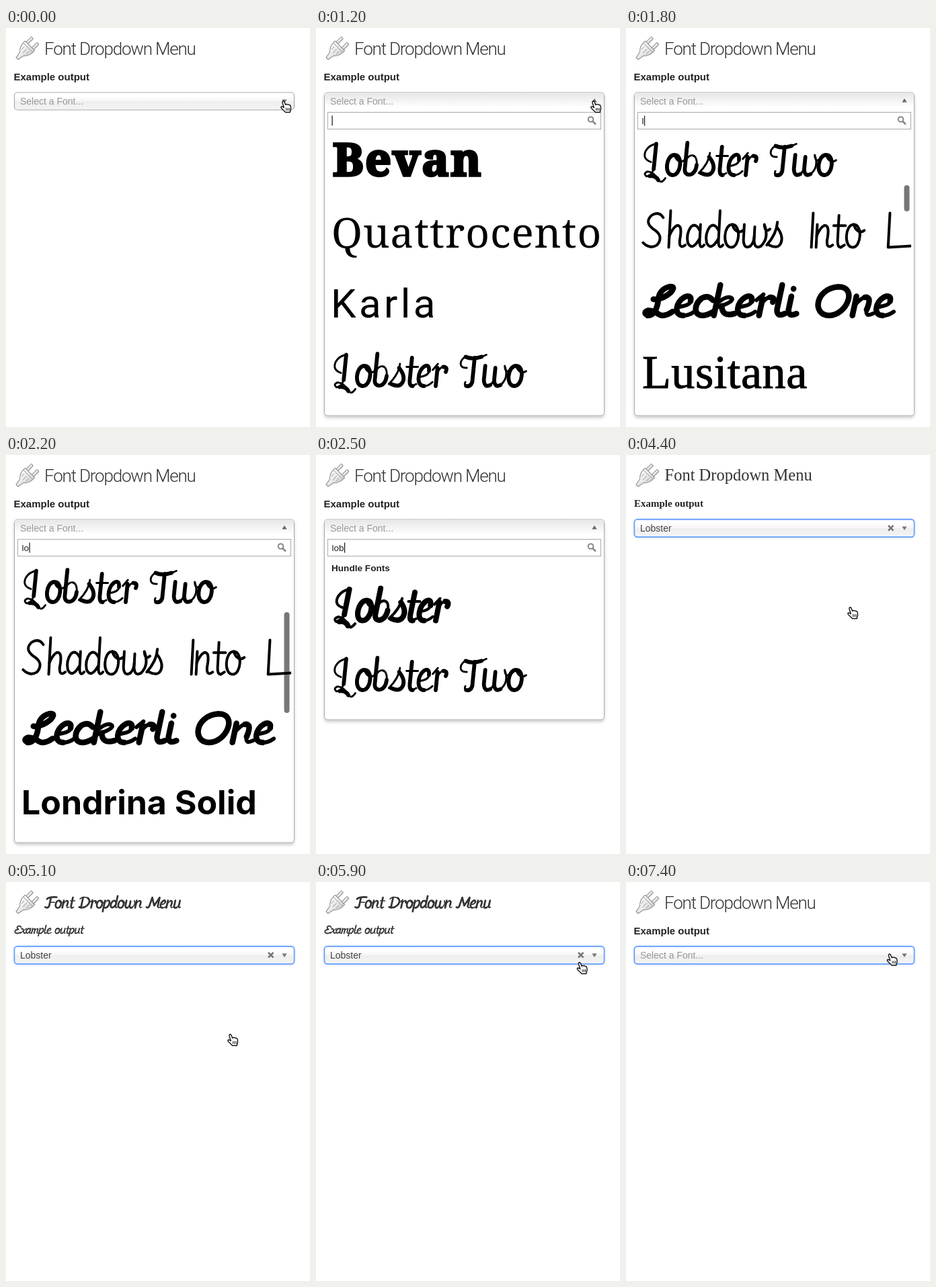
An HTML page for the animation above (8 s loop, 452 by 594 pixels).

```html
<!DOCTYPE html>
<html lang="en">
<head>
<meta charset="utf-8">
<title>Font Dropdown Menu</title>
<style>
  html, body { margin: 0; width: 100%; height: 100%; overflow: hidden; background: #fff; }
  svg { display: block; width: 100vw; height: 100vh; }
  .sans { font-family: "Liberation Sans", Arial, sans-serif; }
  .light { font-family: Roboto, sans-serif; font-weight: 300; letter-spacing: -1.2px; }
  .serif { font-family: "Liberation Serif", serif; }
  .bold { font-weight: 700; }
  .script path { fill: none; stroke: currentColor; stroke-linecap: round; stroke-linejoin: round; vector-effect: non-scaling-stroke; }
</style>
</head>
<body>
<svg id="stage" viewBox="0 0 452 594" xmlns="http://www.w3.org/2000/svg">
  <defs>
    <linearGradient id="closedFill" x2="0" y2="1">
      <stop offset=".2" stop-color="#fff"/><stop offset=".5" stop-color="#f6f6f6"/>
      <stop offset=".52" stop-color="#eee"/><stop offset="1" stop-color="#f4f4f4"/>
    </linearGradient>
    <linearGradient id="openFill" x2="0" y2="1">
      <stop offset=".1" stop-color="#e9e9e9"/><stop offset=".85" stop-color="#fff"/>
    </linearGradient>
    <linearGradient id="metal">
      <stop offset="0" stop-color="#fff"/><stop offset="1" stop-color="#d4d4d4"/>
    </linearGradient>
    <filter id="glow" x="-5%" y="-40%" width="110%" height="180%">
      <feDropShadow dx="0" dy="0" stdDeviation="1.8" flood-color="#3c7df0" flood-opacity=".55"/>
    </filter>
    <filter id="drop" x="-5%" y="-5%" width="110%" height="115%">
      <feDropShadow dx="0" dy="3" stdDeviation="2" flood-opacity=".2"/>
    </filter>
    <clipPath id="listClip"><rect x="16" y="152" width="408" height="420"/></clipPath>
  </defs>
  <rect width="452" height="594" fill="#fff"/>

  <g transform="translate(32 30) rotate(45)" fill="url(#metal)" stroke="#8a8a8a" stroke-linejoin="round">
    <rect x="-8" y="-16" width="4" height="12" rx="1"/>
    <rect x="4" y="-16" width="4" height="12" rx="1"/>
    <path d="M-10-5H10V0Q9 8 4 12L2 22H-2L-4 12Q-9 8-10 0z"/>
    <path d="M-10-1H10M-5 2v6M0 2v8M5 2v6" fill="none" stroke="#aaa"/>
  </g>

  <g id="headSans" fill="#333">
    <text class="light" x="57" y="39.5" font-size="26">Font Dropdown Menu</text>
    <text class="sans bold" x="11.5" y="78" font-size="15" fill="#222">Example output</text>
  </g>
  <g id="headSerif" class="serif" fill="#333">
    <text x="57.5" y="38" font-size="24.5">Font Dropdown Menu</text>
    <text class="bold" x="12" y="77" font-size="15" fill="#222">Example output</text>
  </g>
  <g id="headScript" color="#333"></g>

  <g id="closed">
    <rect id="field" x="12.5" y="96" width="416" height="26" rx="4.5" fill="url(#closedFill)"/>
    <path d="M410.3 106.5h7.4l-3.7 5.5z" fill="#777"/>
    <path id="clear" d="M390 105l7.5 7.5m0-7.5l-7.5 7.5" stroke="#777" stroke-width="2.5"/>
  </g>

  <g id="open">
    <rect id="panel" x="12.5" y="96" width="416" rx="4.5" fill="#fff" stroke="#aaa" filter="url(#drop)"/>
    <path d="M13 122v-21.5q0-4 4-4H424q4 0 4 4V122z" fill="url(#openFill)"/>
    <path d="M410.3 110.5h7.4l-3.7-5.5z" fill="#666"/>
    <rect x="17.5" y="125.5" width="406" height="25" fill="#fff" stroke="#aaa"/>
    <g fill="none" stroke="#888" stroke-width="2">
      <circle cx="408.5" cy="136" r="3.8"/><path d="M411.5 139l4.5 4.5" stroke-width="2.5"/>
    </g>
    <text id="query" class="sans" x="23.5" y="142.5" font-size="13.5" fill="#222"></text>
    <rect id="caret" y="130.5" width="1.2" height="15" fill="#111"/>
    <g clip-path="url(#listClip)">
      <g id="listAll">
        <text x="25" y="220" font-size="68" font-weight="700" font-family="'Noto Serif', serif" stroke="#000" stroke-width="3.5" letter-spacing="2.2">Bevan</text>
        <text x="23" y="327" font-size="62" font-weight="300" font-family="'Noto Serif', serif" letter-spacing="1">Quattrocento</text>
        <text x="22" y="431" font-size="60" font-family="Roboto, sans-serif" letter-spacing="4.4">Karla</text>
      </g>
      <g id="listL">
        <text id="lusitana" class="serif" x="24" y="536" font-size="70" stroke="#000" letter-spacing=".6">Lusitana</text>
        <text id="solid" x="23" y="535" font-size="50" font-weight="700" font-family="Inter, sans-serif">Londrina Solid</text>
        <rect id="thumb" x="413.5" y="234" width="8" rx="4" fill="#777"/>
      </g>
      <g id="listLob">
        <text class="sans bold" x="23" y="173" font-size="13.6" fill="#222">Hundle Fonts</text>
      </g>
    </g>
  </g>

  <text id="value" class="sans" x="21" y="113.5" font-size="14"></text>

  <g id="hand">
    <path d="M5.3 10.5L3 3.2Q2.7 1 4.3.8Q5.6.8 6.2 2.6L7.6 6.2Q8.8 4.9 10.3 6Q11.6 5 12.7 6.6Q14.6 6.2 15.2 8.4L15.6 12L14.2 17.5H7.6L2 12Q0 9.8 1.6 9Q3 8.6 5.3 10.5Z" fill="#fff" stroke="#111" stroke-width="1.4" stroke-linejoin="round"/>
    <path d="M8.6 11v4M10.8 11v4M13 11v4" stroke="#222"/>
  </g>
  <path id="beam" d="M5 1q3 0 3 2q0-2 3-2M8 3v12M5 17q3 0 3-2q0 2 3 2" fill="none" stroke="#333"/>
</svg>
<script>
const LOOP = 8000;
const $ = id => document.getElementById(id);
const NS = 'http://www.w3.org/2000/svg';

// Pen strokes per letter: [advance, full stroke, hairline]; baseline at 0, x-height 10.
const PEN = {
  a: [8, 'M6-7Q4-11 2-9Q0-6 1-2Q3 2 6-4M6-10V-2', 'M6-2Q6.5 1 8-1'],
  b: [7.3, 'M1-16V-3C1 1 6 1 6-5', 'M6-5C6-11 2-11 1-7'],
  c: [6.5, 'M6-8Q4-11 2-9Q0-6 1-2Q3 2 7-2'],
  d: [8, 'M6-7Q4-11 2-9Q0-6 1-2Q3 2 6-4M6-16V-2', 'M6-2Q6.5 1 8-1'],
  e: [6.6, 'M5-7.5C5-10.5 3.5-10.5 2.5-9.5C0-7 0 0 3.5 0', 'M1-4.5Q5-5 5-7.5M3.5 0Q5.5 0 7-2'],
  h: [8, 'M1-16V0M4-9.5Q6.5-10 5.5-3', 'M1-5Q2.5-9 4-9.5M5.5-3Q5.5 1 8-1'],
  i: [4, 'M1-10V-3Q1.5 1 4-1M1.2-14v.1'],
  k: [8, 'M1-16V0M3-5Q4 1 8-1', 'M1-4Q7-7 6-9Q4-11 1-6'],
  l: [4, 'M1-16V-3Q1.5 1 4-1'],
  m: [10.5, 'M1-10V0M4.5-9V0M8.5-9V-2', 'M1-5Q3-11 4.5-9M4.5-5Q7-11 8.5-9M8.5-2Q8.5 1 11-1'],
  n: [8, 'M1-10V0M4-9.5Q6.5-10 5.5-3', 'M1-5Q2.5-9 4-9.5M5.5-3Q5.5 1 8-1'],
  o: [7.6, 'M3.5-10C-.3-10-.3 0 3.5 0S7.3-10 3.5-10', 'M3.5-10c1 3 3 4 4.6 2.6'],
  p: [7.5, 'M1-10V5M4-10Q7-10 6-4Q5 0 3 0', 'M1-6Q2.5-10 4-10M3 0Q1.5 0 1-2'],
  r: [6.8, 'M2-9V0M4.5-9.5Q6.5-9.5 5.8-7', 'M0-8L2-11M2-6Q3-9.5 4.5-9.5'],
  s: [7, 'M3.8-9Q7-5 6-2Q5 1 1-1', 'M0-1Q4-6 4-11'],
  t: [5, 'M2-14V-3Q2 0 3.5 0', 'M3.5 0L5-1M0-9.5H5'],
  u: [8, 'M1-10V-3Q1 1 4-.5M6-10V-2', 'M4-.5Q6-2 6-6M6-2Q6.5 1 8-1'],
  w: [11, 'M1-10V-3Q1.5 1 4-.5M5.5-9V-3Q6 1 8.5-.5', 'M4-.5Q5.5-2 5.5-5M8.5-.5Q12-4 9.5-10Q10-6 12-8'],
  x: [7, 'M0-9Q2-11 3.5-5Q5 1 7-1', 'M7-10L0 0'],
  D: [12, 'M3-14V0M8-13.5Q13-9 9-3Q6 1 1-1', 'M0-12Q2-16 8-13.5'],
  E: [9, 'M8-12Q6-16 3-14Q1-11 5-8Q-1-7 1-2Q4 2 9-2'],
  F: [10, 'M4-14V-2Q3 1 0-1M0-12Q2-15 10-14.5', 'M4-7.5H9'],
  I: [3, 'M2-15V0'],
  L: [9.5, 'M4.5-15.5V-3M3 .5Q5.5 0 7 2.5', 'M3-6.5Q-1-8 .2-12Q1.5-15 4.5-15.5M4.5-3Q3.5 1 1.5.5Q0-1 2-1.8Q5-1.5 7 2.5Q8.5 4.5 10 1.5'],
  M: [14, 'M0-1Q3 1 3-4L4-14L8-3L12-14V-2', 'M12-2Q12.5 1 15-1'],
  O: [12, 'M6-15C-2-14-1 0 5 0S13-15 6-15'],
  S: [10, 'M8-13Q6-16 3-14Q0-11 4-8Q9-5 6-1Q3 1 0-2'],
  T: [10, 'M2-14.5Q5-13 9-14.5M6-14V-2Q5.5 .5 3.5 0', 'M3-9Q-.5-9 .3-12.5Q1-14 2-14.5M9-14.5L11-15.5M3.5 0Q2.5-.5 3-2'],
};
const PLAIN_L = [11, 'M1-15V0L11-.6'];
const LOOPED_L = [10, 'M2-8.5Q5-8 7.5-12Q9-15.5 6.5-15Q3-13.5 3.8-7Q4 0 1.2 0Q-.8-1.5 1-2.6Q3-2.6 5-.6Q7 1 9.5-2'];

function script(parent, text, x, y, { sx = 3.4, sy = 3, weight = 5.8, hair = .5, slant = -5, space = 5, capL = PEN.L } = {}) {
  const g = document.createElementNS(NS, 'g');
  g.setAttribute('class', 'script');
  g.setAttribute('role', 'img');
  g.setAttribute('aria-label', text);
  g.setAttribute('transform', `translate(${x} ${y}) scale(${sx} ${sy}) skewX(${slant})`);
  let pen = 0;
  const stroke = (d, width) => {
    const p = document.createElementNS(NS, 'path');
    p.setAttribute('d', d);
    p.setAttribute('stroke-width', width);
    p.setAttribute('transform', `translate(${pen} 0)`);
    g.append(p);
  };
  for (const ch of text) {
    if (ch === ' ') { pen += space; continue; }
    const [advance, full, thin] = ch === 'L' ? capL : PEN[ch];
    stroke(full, weight);
    if (thin) stroke(thin, weight * hair);
    pen += advance;
  }
  parent.append(g);
}

script($('headScript'), 'Font Dropdown Menu', 58, 38.5, { sx: 1.38, sy: 1.1, weight: 2.7, hair: .6, slant: -10 });
script($('headScript'), 'Example output', 12, 76.5, { sx: 1.04, sy: .75, weight: 1.8, hair: .6, slant: -10 });
script($('listAll'), 'Lobster Two', 25, 533);
script($('listL'), 'Lobster Two', 25, 219);
script($('listL'), 'Shadows Into L', 25, 326.5, { sx: 3.5, sy: 3.4, weight: 4, hair: 1, slant: -3, space: 10, capL: PLAIN_L });
script($('listL'), 'Leckerli One', 27, 428, { sx: 4.3, sy: 2.85, weight: 8.5, hair: .7, slant: -8, space: 6.5, capL: LOOPED_L });
script($('listLob'), 'Lobster', 25, 246.5, { weight: 8, hair: .5, slant: -10 });
script($('listLob'), 'Lobster Two', 25, 350);

// Pointer stops: time, x, y
const STOPS = [
  [0, 408, 108], [2900, 408, 108], [3300, 386, 158], [3800, 338, 252], [4000, 329, 226],
  [5500, 329, 226], [5900, 387.5, 119], [6000, 387.5, 119], [6200, 387.5, 106.5], [LOOP, 387.5, 106.5],
];
function pointerAt(t) {
  const i = STOPS.findIndex(s => s[0] > t);
  const [t0, x0, y0] = STOPS[i - 1], [t1, x1, y1] = STOPS[i];
  const k = (t - t0) / (t1 - t0);
  return [x0 + (x1 - x0) * k, y0 + (y1 - y0) * k];
}

const show = (id, on) => $(id).setAttribute('display', on ? 'inline' : 'none');
const set = (id, attrs) => { for (const k in attrs) $(id).setAttribute(k, attrs[k]); };

function draw(time) {
  const t = Math.floor(time / 100) * 100;
  const within = (a, b) => t >= a && t < b;
  const isOpen = within(1200, 4400);
  const chosen = within(4400, 6900);

  show('headSerif', within(4400, 4500));
  show('headScript', within(4500, 7100));
  show('headSans', t < 4400 || t >= 7100);

  show('closed', !isOpen);
  show('open', isOpen);
  show('clear', chosen);
  const active = t >= 4400;
  set('field', { stroke: active ? '#5897fb' : '#aaa', 'stroke-width': active ? 1.4 : 1.2, filter: active ? 'url(#glow)' : 'none' });
  $('value').textContent = chosen ? 'Lobster' : 'Select a Font...';
  set('value', { fill: chosen ? '#444' : '#999' });

  const typed = t < 1600 ? 0 : t < 2000 ? 1 : t < 2400 ? 2 : 3;
  $('query').textContent = 'lob'.slice(0, typed);
  set('caret', { x: [23.5, 27, 34.5, 42][typed] });
  show('caret', !within(3000, 3500) && t < 4000);
  set('panel', { height: typed < 3 ? 481 : 298 });
  show('listAll', typed === 0);
  show('listL', typed === 1 || typed === 2);
  show('listLob', typed === 3);
  show('lusitana', typed === 1);
  show('solid', typed === 2);
  set('thumb', { height: typed === 2 ? 150 : 39 });

  const [x, y] = pointerAt(t);
  const visible = !within(1600, 3000);
  const overText = within(3000, 3500) && y > 116;
  for (const id of ['hand', 'beam']) set(id, { transform: `translate(${x} ${y})` });
  show('hand', visible && !overText);
  show('beam', visible && overText);
}

function tick() {
  draw(performance.now() % LOOP);
  requestAnimationFrame(tick);
}
tick();
</script>
</body>
</html>
```
